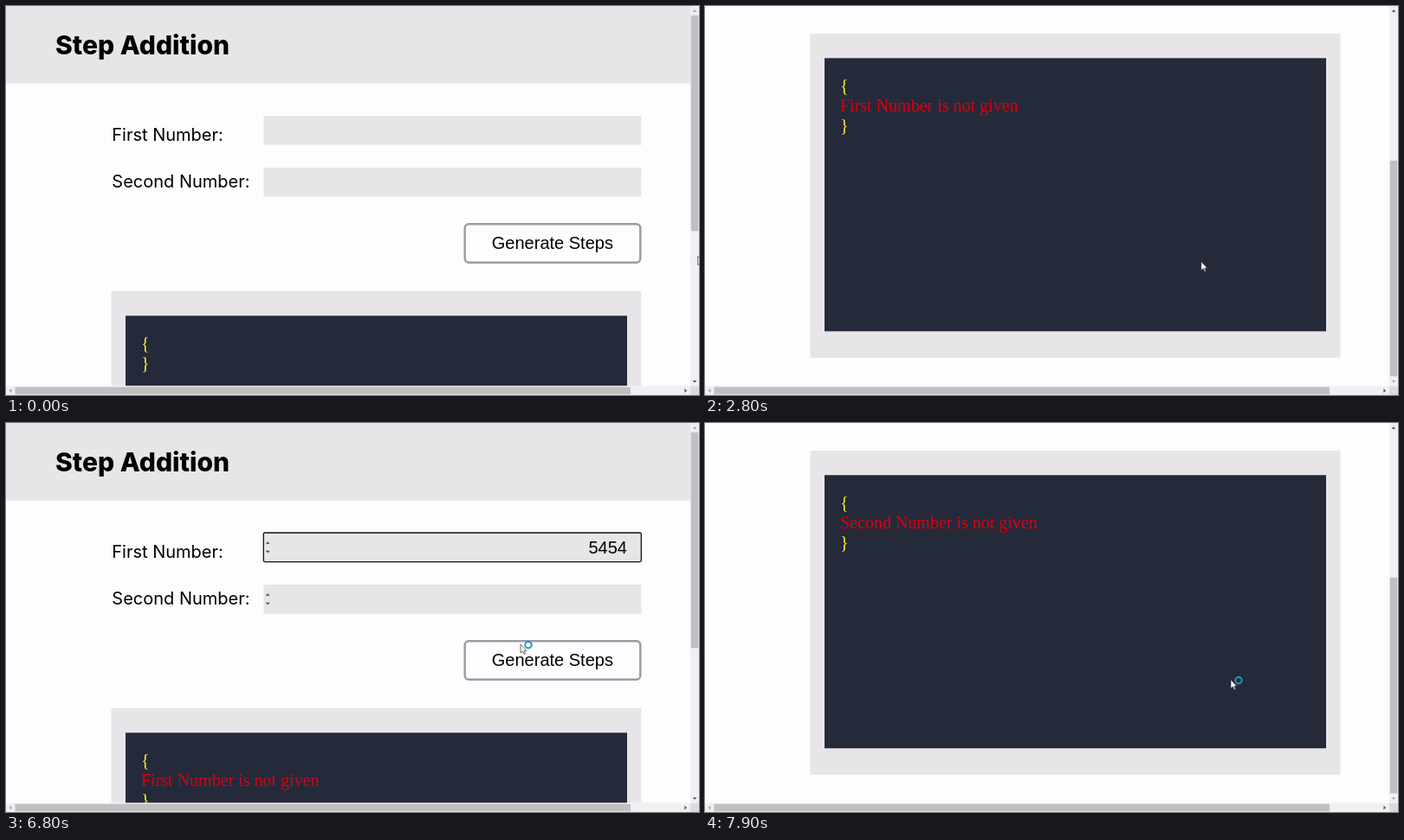
Animation, 800 px wide and 450 px high, one loop 8000 ms. Source, as an HTML page:

```html
<!DOCTYPE html>
<html lang="en">
<head>
<meta charset="utf-8">
<title>Step Addition</title>
<style>
  html, body { margin: 0; width: 100%; height: 100%; overflow: hidden; background: #fefcff; }
  svg { display: block; }
  .gray { fill: #e7e5e8; }
  .label { font: 20px Inter, sans-serif; }
  .title { font: 800 30px Inter, sans-serif; }
  .ui { font: 20px "Liberation Sans", Arial, sans-serif; }
  .code { font: 20px "Liberation Serif", "Times New Roman", serif; }
  .brace { fill: #ffee32; }
  .error { fill: #da0010; }
  .track { fill: #f1eff2; }
  .thumb { fill: #c1bfc2; }
  .pointer { fill: #fff; stroke: #333; stroke-width: .7; stroke-linejoin: round; }
</style>
</head>
<body>
<svg width="800" height="450" viewBox="0 0 800 450">
  <defs>
    <path id="tip" d="M-2.5 1.3h5L0-1.3z"/>
    <g id="spinner" fill="#4a4a4a">
      <use href="#tip" transform="translate(302.2 138.5)"/>
      <use href="#tip" transform="translate(302.2 149) scale(1 -1)"/>
    </g>
  </defs>
  <rect width="800" height="450" fill="#fefcff"/>

  <svg width="790" height="439.5">
    <g id="page">
      <rect class="gray" width="790" height="89.5"/>
      <text class="title" x="57" y="55.5">Step Addition</text>
      <text class="label" x="122.3" y="155.5">First Number:</text>
      <text class="label" x="122.3" y="209.5">Second Number:</text>
      <rect class="gray" x="297.5" y="127" width="436" height="33.7"/>
      <rect class="gray" x="297.5" y="187" width="436" height="33.7"/>
      <rect id="focusRing" x="297.3" y="127" width="436" height="33.6" rx="1.5" fill="none" stroke="#111" stroke-width="1.3"/>
      <use id="firstSpinner" href="#spinner"/>
      <use id="secondSpinner" href="#spinner" y="60"/>
      <text id="number" class="ui" x="717" y="151" text-anchor="end"></text>
      <rect id="caret" x="716.3" y="132" width="1.2" height="23"/>
      <rect id="button" x="529.7" y="252.2" width="202.6" height="44.6" rx="4.5" stroke="#9e9ca0" stroke-width="2.5"/>
      <text class="ui" x="560.8" y="281">Generate Steps</text>
      <rect class="gray" x="121.5" y="329.8" width="612" height="375"/>
      <rect x="138" y="358.3" width="579" height="316" fill="#242a3a"/>
      <g class="code">
        <text class="brace" x="156" y="397">{</text>
        <text id="error" class="error" x="156" y="419.5"></text>
        <text id="closing" class="brace" x="156">}</text>
      </g>
    </g>
  </svg>

  <rect class="track" x="790" width="10" height="440"/>
  <rect class="track" y="439.5" width="790" height="10.5"/>
  <rect x="790" y="440" width="10" height="10" fill="#dcdadd"/>
  <rect id="thumb" class="thumb" x="790.7" width="8.6" height="249.5"/>
  <rect class="thumb" x="10.5" y="440.7" width="710.5" height="8.6"/>
  <use id="upArrow" href="#tip" transform="translate(795 5.5)"/>
  <use id="downArrow" href="#tip" transform="translate(795 434.5) rotate(180)"/>
  <use href="#tip" transform="translate(5 445) rotate(-90)" fill="#a3a1a4"/>
  <use href="#tip" transform="translate(784.7 445) rotate(90)" fill="#505050"/>

  <g id="cursor">
    <path id="arrow" class="pointer" d="M0 0V10L2.4 8 4 11.5 5.5 11 4 7.5H7z"/>
    <circle id="busy" cx="9" cy=".7" r="3.7" fill="none" stroke="#1f9aba" stroke-width="2"/>
    <path id="hand" class="pointer" d="M-1 .8Q0-.6 1 .8V4.4L5 5Q7 5 6.7 8L5.5 12H.5L-2.8 7.7Q-3 6-1 7z"/>
    <path id="beam" d="M-2.5-7.5h5M0-7.5v15M-2.5 7.5h5" stroke="#222"/>
  </g>
</svg>
<script>
const LOOP = 8000, STEP = 100, MAX_SCROLL = 298;
const FIRST_CLICK = 2200, SECOND_CLICK = 7300;

// Each move glides the cursor on to (x, y) between two times.
const START = { x: 798.6, y: 289.5 };
const moves = [
  { from: 0, to: 500, x: 150, y: 60 },
  { from: 500, to: 1000, x: 558, y: 169 },
  { from: 1200, to: 1900, x: 611, y: 261 },
  { from: FIRST_CLICK, to: 2500, x: 577, y: 293 },
  { from: 2500, to: 3600, x: 554, y: 308 },
  { from: 3800, to: 4500, x: 600, y: 144 },
  { from: 6400, to: 6800, x: 594, y: 256 },
  { from: 6800, to: 7000, x: 611, y: 292 },
  { from: 7700, to: 7900, x: 607, y: 297 }
];

const el = id => document.getElementById(id);
const show = (id, on) => el(id).setAttribute('display', on ? 'inline' : 'none');
const within = (t, from, to) => t >= from && t < to;
const tipColor = active => active ? '#505050' : '#a3a1a4';

function ease(t, from, to) {
  const k = Math.min(1, Math.max(0, (t - from) / (to - from)));
  return k * k * (3 - 2 * k);
}

function cursorAt(t) {
  return moves.reduce((p, m) => {
    const k = ease(t, m.from, m.to);
    return { x: p.x + (m.x - p.x) * k, y: p.y + (m.y - p.y) * k };
  }, START);
}

function scrollAt(t) {
  const down = ease(t, FIRST_CLICK, FIRST_CLICK + 455);
  const up = ease(t, 3400, 3600);
  const downAgain = ease(t, SECOND_CLICK, SECOND_CLICK + 525);
  return MAX_SCROLL * (down - up + downAgain);
}

function render(t) {
  const { x, y } = cursorAt(t);
  const scroll = scrollAt(t);
  const pageY = y + scroll;
  const hover = within(t, 1700, 2400) || within(t, 6900, 7800);
  const busy = t === 6800 || t >= 7800;
  const inField = within(x, 298, 733) && (within(pageY, 127, 161) || within(pageY, 187, 221));

  el('page').setAttribute('transform', `translate(0 ${-scroll})`);
  el('thumb').setAttribute('y', 10.8 + scroll * .564);
  el('upArrow').setAttribute('fill', tipColor(scroll > 0));
  el('downArrow').setAttribute('fill', tipColor(scroll < MAX_SCROLL));

  show('focusRing', within(t, 4700, SECOND_CLICK));
  show('firstSpinner', within(t, 1000, 1200) || within(t, 4500, SECOND_CLICK));
  show('secondSpinner', within(t, 1200, 1500) || within(t, 6700, 6900));
  show('caret', within(t, 4700, 5200) || within(t, 5700, 6800));
  el('number').textContent = '5454'.slice(0, Math.max(0, (t - 5900) / STEP));
  el('button').setAttribute('fill', hover ? '#f0eef1' : '#fefcff');

  const missing = t >= SECOND_CLICK ? 'Second' : t >= FIRST_CLICK ? 'First' : '';
  el('error').textContent = missing && `${missing} Number is not given`;
  el('closing').setAttribute('y', missing ? 443 : 420);

  el('cursor').setAttribute('transform', `translate(${x} ${y})`);
  show('hand', hover && !busy);
  show('beam', inField && !hover && !busy);
  show('arrow', busy || !hover && !inField);
  show('busy', busy);
}

function frame() {
  const t = performance.now() % LOOP;
  render(Math.floor(t / STEP) * STEP);
  requestAnimationFrame(frame);
}
frame();
</script>
</body>
</html>
```
